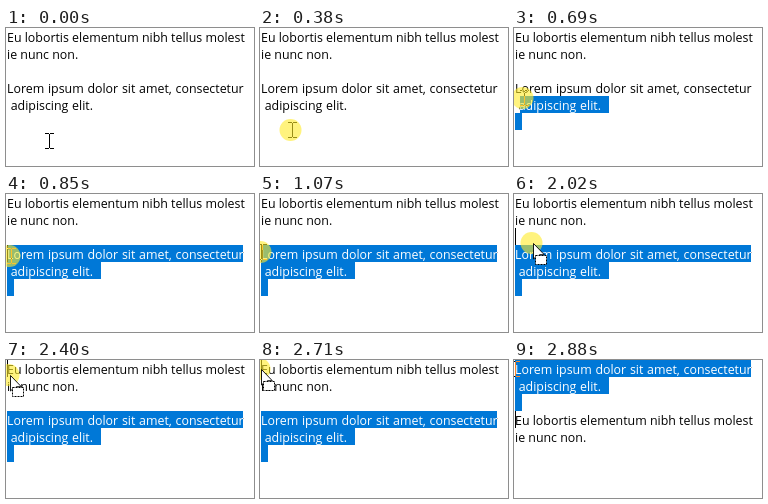
An HTML page for the animation above (7880 ms loop, 248 by 138 pixels).

```html
<!DOCTYPE html>
<html lang="en">
<head>
<meta charset="utf-8">
<title>Drag and drop text</title>
<style>
  html, body { margin: 0; width: 100%; height: 100%; overflow: hidden; background: #fff; }
  svg { display: block; width: 100%; height: 100%; }
  text { font: 12.4px "Open Sans", "Noto Sans", sans-serif; white-space: pre; }
  #lorem { word-spacing: .5px; }
  #beam { mix-blend-mode: difference; }
</style>
</head>
<body>
<svg viewBox="0 0 248 138">
  <defs>
    <g id="lorem">
      <text x="1" y="13.5">Lorem ipsum dolor sit amet, consectetur</text>
      <text x="1" y="30.5"> adipiscing elit.</text>
    </g>
    <g id="eu">
      <text x="1" y="13.5">Eu lobortis elementum nibh tellus molest</text>
      <text x="1" y="30.5">ie nunc non.</text>
    </g>
    <path id="area"/>
    <clipPath id="selected"><use href="#area"/></clipPath>
  </defs>

  <rect width="248" height="138" fill="#fff"/>
  <use id="euText" href="#eu"/>
  <use class="lorem" href="#lorem"/>
  <use href="#area" fill="#0078d7"/>
  <g clip-path="url(#selected)" fill="#fff"><use class="lorem" href="#lorem"/></g>
  <rect id="caret" x="1" width="1" height="17"/>

  <path id="beam" d="M-4-7.5H0M1-7.5h4M-4 7.5H0M1 7.5h4M.5-7V7" fill="none" stroke="#fff"/>
  <circle id="press" r="11" cx="-1.5" fill="#ffeb28" fill-opacity=".6"/>
  <g id="arrow">
    <path d="M.5.5v15.5l3.6-3.5 2.4 5.6 2.3-1-2.4-5.4h4.9z" fill="#fff" stroke="#000" stroke-width=".9"/>
    <rect id="box" x="2.5" y="12.5" width="11" height="9" fill="#fff" stroke="#000" stroke-dasharray="2 1"/>
  </g>
</svg>
<script>
const LOOP = 7880, STEP = 76, LINE = 17;
const $ = id => document.getElementById(id);
const loremTexts = document.querySelectorAll('.lorem');

const show = (id, on) => $(id).setAttribute('visibility', on ? 'inherit' : 'hidden');
const place = (el, x, y) => el.setAttribute('transform', `translate(${x} ${y})`);
const row = (line, from, to) => `M${from} ${line * LINE}H${to}v${LINE}H${from}z`;

// Mouse positions are sampled in steps; each glide slows towards its end.
function glide(t, start, steps, offset, from, to, power) {
  const k = Math.min(steps - 1, Math.floor((t - start + 5) / STEP));
  const p = 1 - (1 - (k + offset) / (steps - 1 + offset)) ** power;
  return from.map((v, i) => Math.round(v + (to[i] - v) * p));
}

function pointerAt(t) {
  if (t < 80) return [43, 113];
  if (t < 310) return [40, 113];
  if (t < 1320) return glide(t, 310, 11, 0, [40, 113], [2, 58], 2.2);
  if (t < 2020) return glide(t, 1320, 5, 0, [2, 58], [24, 60], 1.6);
  return glide(t, 2020, 10, 1, [24, 60], [1, 9], 2.4);
}

function selectionAt(t, y) {
  if (t < 310) return '';
  const top = t >= 2880 ? 0 : 3;
  const line = t < 1320 ? Math.floor(y / LINE) : 3;
  return (line <= 3 ? row(top, 1, 237) : '') +
    (line <= 4 ? row(top + 1, line === 4 ? 6 : 1, 95) : '') +
    (line <= 5 ? row(top + 2, 1, 8) : '');
}

function draw(t) {
  const [x, y] = pointerAt(t);
  const dropped = t >= 2880;
  const dragging = t >= 2020 && !dropped;
  const arrow = t >= 1320 && !dropped;

  $('area').setAttribute('d', selectionAt(t, y));
  place($('euText'), 0, dropped ? 3 * LINE : 0);
  loremTexts.forEach(el => place(el, 0, dropped ? 0 : 3 * LINE));

  const caretLine = dragging ? Math.floor(y / LINE) : 3;
  place($('caret'), 0, caretLine * LINE);
  show('caret', dragging || dropped || (t >= 310 && y < 68));

  for (const id of ['beam', 'press', 'arrow']) place($(id), x, y);
  show('press', (t >= 310 && t < 1320) || (t >= 1790 && !dropped));
  show('beam', !arrow);
  show('arrow', arrow);
  show('box', dragging);
}

const begin = performance.now();
function tick() {
  draw((performance.now() - begin) % LOOP);
  requestAnimationFrame(tick);
}
tick();
</script>
</body>
</html>
```
